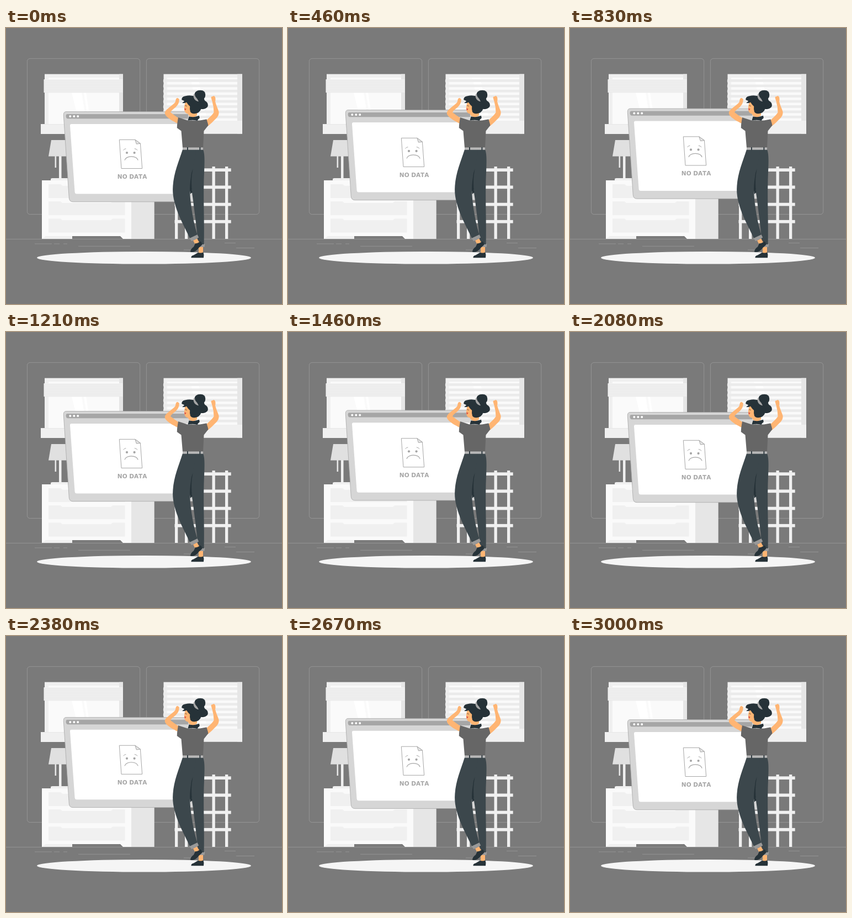
Recreate the animation shown at these times as an HTML page with a canvas. Size 500 by 500 pixels, loop 3040 ms.

```html
<!DOCTYPE html>
<html lang="en">
<head>
<meta charset="utf-8">
<title>No data</title>
<style>
html, body { margin: 0; width: 100%; height: 100%; overflow: hidden; background: #7a7a7a; }
canvas { display: block; width: 500px; height: 500px; }
</style>
</head>
<body>
<canvas id="stage"></canvas>
<script>
const canvas = document.getElementById('stage');
const ctx = canvas.getContext('2d');
const ratio = window.devicePixelRatio || 1;
canvas.width = canvas.height = Math.round(500 * ratio);

const LOOP = 3040, HALF = 1500, RISE = 10, FPS = 24;
const DARK = '#263238', PANTS = '#3c474c', SKIN = '#ffb573', GREY = '#a6a6a6';

function rect(x, y, w, h, color) {
  ctx.fillStyle = color;
  ctx.fillRect(x, y, w, h);
}

function shape(d, fill, stroke, width = 1) {
  const path = new Path2D(d);
  if (fill) {
    ctx.fillStyle = fill;
    ctx.fill(path);
  }
  if (stroke) {
    ctx.strokeStyle = stroke;
    ctx.lineWidth = width;
    ctx.stroke(path);
  }
}

function dot(x, y, r, color) {
  ctx.fillStyle = color;
  ctx.beginPath();
  ctx.arc(x, y, r, 0, Math.PI * 2);
  ctx.fill();
}

function line(x1, x2, y) {
  shape(`M${x1} ${y}H${x2}`, null, '#9a9a9a', 0.8);
}

function panel(x) {
  ctx.strokeStyle = '#9c9c9c';
  ctx.lineWidth = 0.8;
  ctx.beginPath();
  ctx.roundRect(x, 55.4, 204.3, 282.2, 5);
  ctx.stroke();
}

function leftWindow() {
  rect(70, 83.5, 142, 91, '#f0f0f0');
  rect(205, 83.5, 7, 91, '#e6e6e6');
  rect(77, 90, 128, 84, '#fafafa');
  shape('M119 117H137L146 174H133Z M141 117H145L154 174H150Z', '#fff');
  rect(68.5, 93, 143, 24, '#f0f0f0');
  for (let y = 95.5; y < 117; y += 3) rect(69.5, y, 141, 0.7, '#e6e6e6');
  rect(63, 174, 149, 18, '#f0f0f0');
  rect(70, 174, 142, 1, '#e6e6e6');
}

function rightWindow() {
  rect(285.5, 83.5, 142.5, 108, '#f0f0f0');
  rect(292, 90, 127, 78, '#fafafa');
  shape('M334 90H348L365 168H351Z', '#fff');
  for (let y = 93; y < 168; y += 9.4) {
    rect(285, y, 134, 4.8, '#ebebeb');
    shape(`M286 ${y}Q283.5 ${y + 3} 286 ${y + 6}Z`, '#ebebeb');
  }
  rect(419, 83.5, 9, 108, '#e6e6e6');
  rect(285.5, 168, 142.5, 23.5, '#f0f0f0');
}

function lamp() {
  rect(88.5, 230, 2.6, 23, '#e6e6e6');
  rect(96, 230, 4.5, 43, '#f0f0f0');
  shape('M82 203H108L114 232.5H77Z', '#e0e0e0');
  shape('M81 276V274Q81 272 84 272H114V276Z', '#f0f0f0');
}

function dresser() {
  rect(226, 276, 42.7, 106, '#e6e6e6');
  shape('M65 276H227V382H212L207 377H120V382H65Z', '#fafafa');
  shape('M65 382L72 377H120V382Z', '#f0f0f0');
  for (const y of [283, 314.3, 345.5])
    shape(`M77 ${y}H99L102 ${y + 2.7}H190L193 ${y}H215.5V${y + 25}H77Z`, '#f0f0f0');
}

function shelf() {
  for (const x of [306, 324, 373.5, 397]) rect(x, 251, 5.3, 131, '#f0f0f0');
  for (let i = 0; i < 4; i++) rect(305.5, 254.3 + i * 31.2, 102.2, 5.7, '#f0f0f0');
}

function room() {
  rect(0, 0, 500, 500, '#7a7a7a');
  panel(38.4);
  panel(254.4);
  line(0, 500, 382.5);
  line(52, 83, 391);
  line(87, 97, 391);
  line(104, 111, 391);
  line(131, 225, 395.3);
  line(396, 416, 389.5);
  line(417, 450, 398.5);
  line(322, 335, 402);
  leftWindow();
  rightWindow();
  lamp();
  dresser();
  shelf();
  ctx.fillStyle = '#f5f5f5';
  ctx.beginPath();
  ctx.ellipse(250, 416.3, 194, 11.3, 0, 0, Math.PI * 2);
  ctx.fill();
}

function sadPage() {
  shape('M205.3 202.4H233.8L243.4 209.2L246.7 254.5H209Z', '#fff', GREY, 1);
  shape('M233.8 202.4L236.4 210.2L243.4 209.2Z', '#e6e6e6', GREY, 1);
  dot(219, 226, 2.1, GREY);
  dot(232.6, 226, 2.1, GREY);
  shape('M212.6 221.5Q214 219 217.3 218.6M232.8 218.6Q236.4 219 238.2 221.5', null, GREY, 1);
  shape('M215 239.5C217 231 236 230.5 239.2 239.5', null, GREY, 1.2);
}

function screen(dy) {
  ctx.save();
  ctx.translate(0, dy);
  shape('M109 151.6H331Q335 151.6 335.4 156L346 309Q346 314.8 341 314.8H121Q115 314.8 114.3 308L104.3 158Q104 151.6 109 151.6Z',
    '#d6d6d6', GREY, 0.8);
  shape('M111 156H330V164.3H112Q109 164.3 108.6 160Q108.4 156 111 156Z', GREY);
  for (const x of [116.3, 123.3, 130.2]) dot(x, 160.1, 2, '#fff');
  shape('M118.5 174H329L338 300.5H128Q125 300.5 124.6 297L116 177Q115.8 174 118.5 174Z', '#fff');
  sadPage();
  ctx.fillStyle = GREY;
  ctx.font = 'bold 10.5px "DejaVu Sans", sans-serif';
  ctx.fontKerning = 'none';
  ctx.textAlign = 'center';
  ctx.fillText('NO DATA', 228.6, 272.8);
  ctx.restore();
}

function legs() {
  // far foot
  shape('M349 396H357V408H349Z', SKIN);
  shape('M335.5 416.3Q335 412.6 340 411.5L348 406.8Q353 408.5 357.5 406.3Q359.2 411 358 416.3Z', DARK);
  shape('M346.5 391H360.3L359.5 396.8H347.5Z', '#999');
  // far leg
  shape('M332 220H357C361 230 359.5 247 358.4 280C357.5 315 359.5 350 358.6 392H348C346 365 343 345 340.5 325C338 300 333 280 332 255Z', PANTS);
  shape('M338.5 256C335.5 270 335.5 284 337.3 298L333.8 301C331.5 284 332.5 268 338.5 256Z', DARK);
  // near foot
  shape('M339 385L346 381.5L350 388L342.5 391.5Z', SKIN);
  shape('M334.2 404Q335.5 399 340 396.5L343 390Q348.5 391 352.4 386.6Q355.5 389.5 355 393Q349 398 346 402Q341 406.8 336 406Q333.5 406 334.2 404Z', DARK);
  shape('M331.8 380.5L346.5 374L349.2 379.6L336.5 386.3Z', '#999');
  // near leg
  shape('M320 220H344C343 242 337 252 335 270C332 290 333 302 335.5 322C338 342 342 360 346.6 374.3L333 380.7C325 364 317 349 311.5 335C305 317 301 303 302.4 286C304 262 313 242 320 220Z', PANTS);
}

function torso() {
  shape('M312 162L329 167.4H351L363.5 165.2C364.5 170 366.2 173 366.4 176.5L358.5 186.5L357 217H320L317.5 186.5L309.8 181C309.8 174 311 168 312 162Z', '#666');
  shape('M329.5 167.5L331.5 160.5Q341 162 350 158.8L350.8 163Q346.5 166.5 347 168Q338 166 329.5 167.5Z', DARK);
  rect(320, 216.4, 37, 4.3, '#b8b8b8');
  rect(328, 216, 1.8, 5.2, DARK);
  rect(350.5, 216, 1.8, 5.2, DARK);
}

function arms() {
  shape('M308 128.5Q309.5 126 311.5 127L313.8 129Q313.8 134 311.8 138Q308 144 303 147Q299 150 298 152.8Q305 158.5 312.8 163.5L310.7 173C302 168.5 294 164 289.5 158.5Q286 154 289.6 149.5C295 143.5 302 140 306.5 134.5Z', SKIN);
  shape('M371.5 126Q372.3 123.5 374 124.2Q377 121.5 378.5 124.5Q380.3 128 379 133C380.5 140 384 146 385.6 152Q386 158 381.5 163C376 168.5 370.5 174 364.8 178.5L361.4 168.5C366 164.5 373 158.5 376.5 153Q376.5 143 373.7 133.5Z', SKIN);
}

function head() {
  shape('M325 134Q322.5 141 323 146.5Q323 154 329.5 155.5L331.8 159.2Q339 163.5 346 158.5L346 136Z', SKIN);
  shape('M323.2 145.2L326.8 146.8L324 149.5Z', '#d84b43');
  shape('M324.5 140.3L327.5 141.5', null, DARK, 0.8);
  // bun and ponytail
  shape('M341 121Q342 113 352 112.8Q361.5 113 361.3 121Q361.5 125 358.8 128Q359.5 132 363 133.5Q367.5 138 365 143Q360 148.5 352.5 146.5L341 130Z', DARK);
  shape('M318.2 130Q318 124.5 325 123.3Q336 120.5 345 125.5Q355 132 354.3 143Q353 152 345.5 154.5Q337.5 157 334 152Q332.5 147 333.2 142Q329.5 138.8 327 134.5Q323 137 319.2 135.5Q323 133.5 322.8 132Z', DARK);
  shape('M340 119.8Q338.8 125 341.5 129Q344 132.5 349 133.2Q347.5 129 344 125.5Q342 123 342 119.5Z', GREY);
}

function draw(t) {
  const step = Math.min(72, Math.floor((t + 4.9) * FPS / 1000));
  const ms = step * 1000 / FPS;
  const dy = -RISE * (1 - Math.abs(1 - ms / HALF));
  ctx.setTransform(ratio, 0, 0, ratio, 0, 0);
  room();
  screen(dy);
  legs();
  arms();
  torso();
  head();
}

const start = performance.now();
function tick() {
  draw((performance.now() - start) % LOOP);
  requestAnimationFrame(tick);
}
tick();
</script>
</body>
</html>
```
